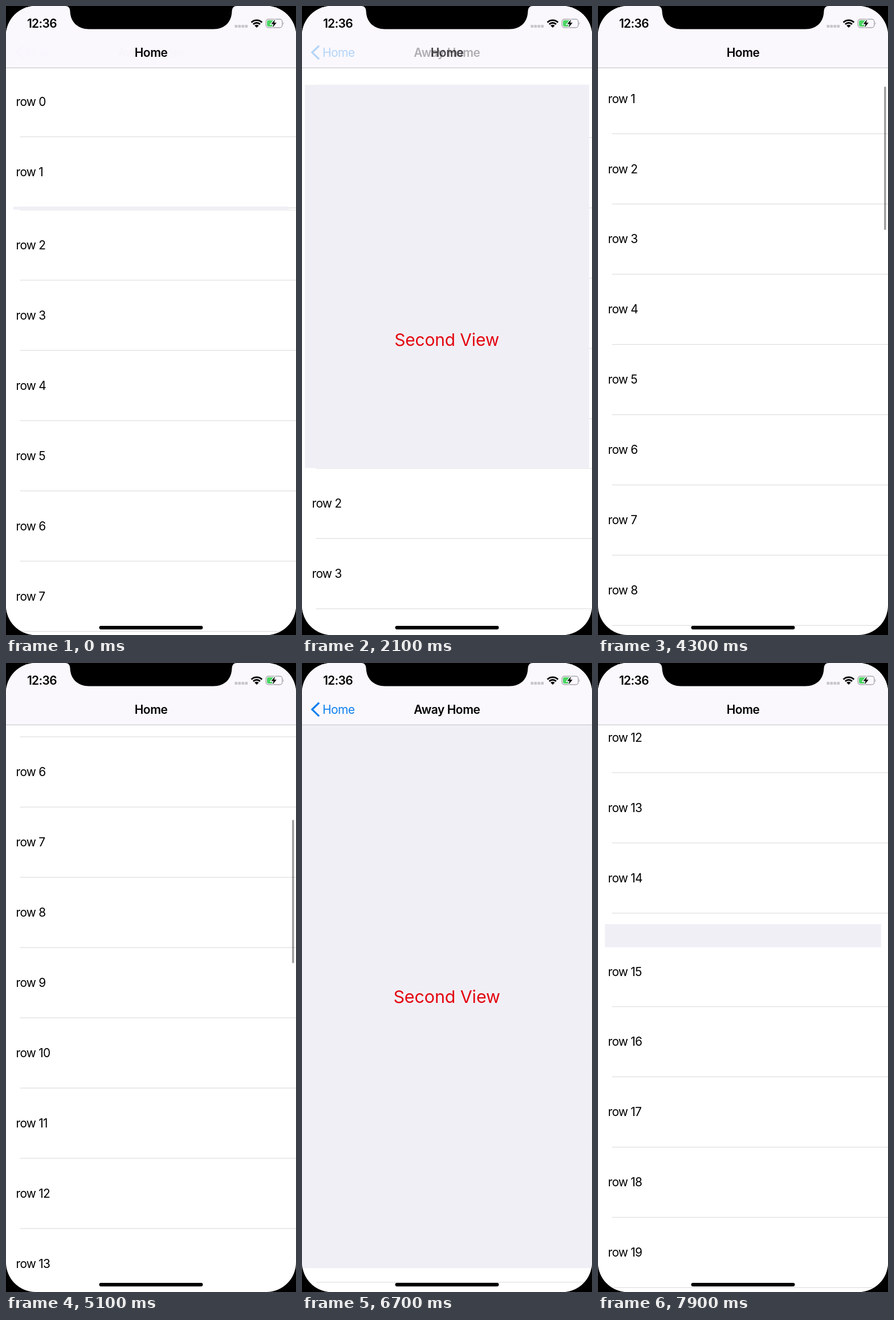
Recreate the animation shown at these times as an HTML page. Size 509 by 1101 pixels, loop 8000 ms.

```html
<!DOCTYPE html>
<html lang="en">
<head>
<meta charset="utf-8">
<title>List split transition</title>
<style>
  html, body { margin: 0; width: 100%; height: 100%; overflow: hidden; background: #000; }
  svg { display: block; width: 100vw; height: 100vh; }
  text { font: 400 20.9px Inter, Roboto, sans-serif; font-optical-sizing: none; letter-spacing: -.025em; }
  #list text { letter-spacing: -.035em; }
  .bold { font-weight: 600; letter-spacing: -.02em; text-anchor: middle; }
  .clock { letter-spacing: -.03em; }
  .big { font-size: 30.5px; letter-spacing: -.004em; text-anchor: middle; fill: #e3040f; }
</style>
</head>
<body>
<svg viewBox="0 0 509 1101">
  <defs>
    <clipPath id="screen"><rect width="509" height="1101" rx="52"/></clipPath>
    <clipPath id="upper"><rect id="upperCut" width="509"/></clipPath>
    <clipPath id="lower"><rect id="lowerCut" width="509" height="1101"/></clipPath>
  </defs>
  <rect width="509" height="1101" fill="#000"/>
  <g clip-path="url(#screen)">
    <rect width="509" height="1101" fill="#fff"/>
    <g id="base"><g id="list"></g></g>

    <g id="detail">
      <rect y="108.2" width="509" height="951.6" fill="#f1eff6"/>
      <text class="big" x="254.1" y="595">Second View</text>
    </g>

    <g id="pieces">
      <g id="top"><g clip-path="url(#upper)">
        <rect width="509" height="1101" fill="#fff"/><use href="#list"/>
      </g></g>
      <g id="bottom"><g clip-path="url(#lower)">
        <rect width="509" height="1101" fill="#fff"/><use href="#list"/>
      </g></g>
    </g>
    <rect id="bar" x="502.2" width="3.3" height="251" rx="1.6" fill="#000"/>

    <rect width="509" height="108" fill="#faf8fd"/>
    <rect y="107.7" width="509" height="1.2" fill="#c9c7cc"/>
    <text id="home" class="bold" x="254.6" y="88.8">Home</text>
    <g id="away">
      <text class="bold" x="254.4" y="88.8">Away Home</text>
      <path d="M30 69.5L17.8 81.3L30 93.2" fill="none" stroke="#0f7fee" stroke-width="3.2"/>
      <text x="36" y="88.8" fill="#0f7fee">Home</text>
    </g>

    <text class="bold clock" x="62.9" y="38.2">12:36</text>
    <g fill="#c9c7cc">
      <rect x="401.4" y="33" width="4.9" height="4.9" rx="1.2"/>
      <rect x="407.4" y="33" width="4.9" height="4.9" rx="1.2"/>
      <rect x="413.4" y="33" width="4.9" height="4.9" rx="1.2"/>
      <rect x="419.4" y="33" width="4.9" height="4.9" rx="1.2"/>
    </g>
    <g fill="none" stroke="#000" stroke-width="2.9">
      <path d="M430.7 28.7A13.2 13.2 0 0 1 449.3 28.7"/>
      <path d="M434 32A8.5 8.5 0 0 1 446 32"/>
      <path d="M440 38L436.2 34.2A5.4 5.4 0 0 1 443.8 34.2Z" fill="#000" stroke="none"/>
    </g>
    <rect x="456.2" y="23.2" width="28.6" height="14.6" rx="4" fill="none" stroke="#9b999d" stroke-width="1.2"/>
    <path d="M486.4 28Q488.4 30.5 486.4 33Z" fill="#9b999d"/>
    <rect x="458" y="25" width="13.5" height="11" rx="2.4" fill="#4cd564"/>
    <path d="M472.4 23.4L465.6 31.6H469.6L467.8 37.8L474.8 29.2H470.6Z" stroke="#faf8fd" stroke-width="2.6" paint-order="stroke"/>
    <rect x="163.5" y="1085" width="182" height="6.2" rx="3.1"/>
  </g>
  <path d="M104 0Q112 0 112.5 9C113 28 126 40.5 146 40.5H364C384 40.5 396 28 396.5 9Q397 0 405 0Z"/>
</svg>
<script>
const LOOP = 8000, STEP = 100, DURATION = 1000, PITCH = 122.95, HEIGHT = 1101;
const $ = id => document.getElementById(id);
const clamp = v => Math.min(1, Math.max(0, v));
const set = (id, attrs) => {
  for (const name in attrs) $(id).setAttribute(name, attrs[name]);
};

// Two visits to the detail view: opening and closing start, split line
const visits = [
  { open: -49, close: 1664, split: 353 },
  { open: 5808, close: 7036, split: 474.6 }
];

$('list').innerHTML = Array.from({ length: 23 }, (_, i) => {
  const line = 230.5 + i * PITCH;
  return `<text x="17.6" y="${line - 54}">row ${i}</text>` +
    `<rect x="24.5" y="${line - .6}" width="485" height="1.2" fill="#dedee0"/>`;
}).join('');

// cubic-bezier(.42, 0, .58, 1)
function ease(x) {
  x = clamp(x);
  let lo = 0, hi = 1;
  for (let i = 0; i < 24; i++) {
    const s = (lo + hi) / 2, r = 1 - s;
    if (1.26 * r * r * s + 1.74 * r * s * s + s * s * s < x) lo = s; else hi = s;
  }
  return lo * lo * (3 - 2 * lo);
}

function scrollAt(t) {
  if (t >= 7000) return 1496.4;
  return 744.9 * (1 - Math.pow(1 - clamp((t - 4211) / 1239), 2.57));
}

function draw(t) {
  const { open, close, split } = visits[t < 4000 ? 0 : 1];
  const closing = t >= close;
  const u = clamp((t - (closing ? close : open)) / DURATION);
  const p = closing ? 1 - ease(u) : ease(u);
  const fade = closing ? 1 - ease(u / .7) : ease(u / .7);
  const scale = .95 + .05 * p;
  const scroll = scrollAt(t);

  set('list', { transform: `translate(0 ${-scroll})` });
  set('base', { visibility: p < 1 ? 'visible' : 'hidden' });
  set('detail', {
    visibility: p > 0 ? 'visible' : 'hidden',
    transform: `translate(254.5 584) scale(${scale}) translate(-254.5 -584)`
  });
  set('pieces', { visibility: p > 0 && p < 1 ? 'visible' : 'hidden' });
  set('upperCut', { height: split });
  set('lowerCut', { y: split });
  set('top', { transform: `translate(0 ${-split * p})` });
  set('bottom', { transform: `translate(0 ${(HEIGHT - split) * p})` });

  set('home', { opacity: 1 - fade });
  set('away', { opacity: fade });
  set('bar', {
    y: 141 + (scroll - 129.5) * .2275,
    opacity: t < 4211 ? 0 : .4 * (1 - clamp((t - 5500) / 200))
  });
}

const start = performance.now();
function tick() {
  const t = performance.now() - start + 5;
  draw(Math.floor(t / STEP) * STEP % LOOP);
  requestAnimationFrame(tick);
}
tick();
</script>
</body>
</html>
```
